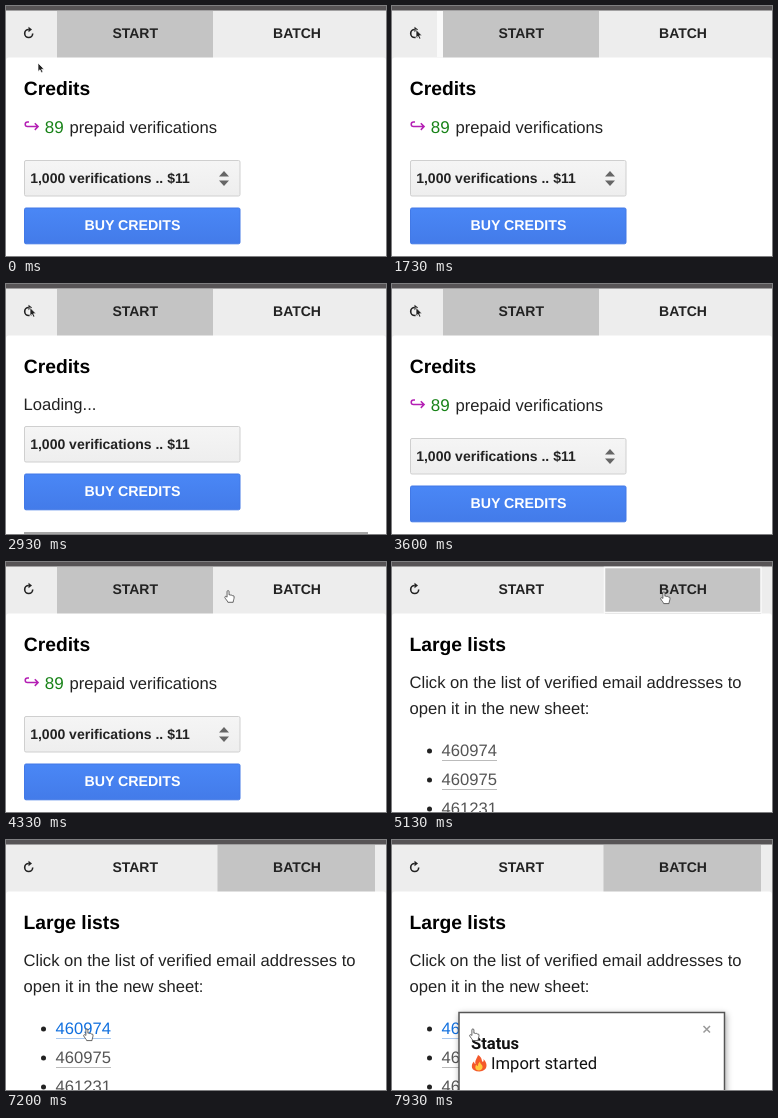
Recreate the animation shown at these times as an HTML page. Size 380 by 250 pixels, loop 8000 ms.

```html
<!DOCTYPE html>
<html lang="en">
<head>
<meta charset="utf-8">
<style>
  html, body { margin: 0; width: 100%; height: 100%; overflow: hidden; background: #fff; }
  svg { display: block; width: 380px; height: 250px; font: 16.6px "Liberation Sans", Arial, sans-serif; fill: #222; text-rendering: geometricPrecision; }
  .bold { font-weight: bold; font-size: 14px; }
  .title { font-weight: bold; font-size: 19.3px; fill: #000; }
  .link { fill: #555; }
  .link path { stroke: #bbb; }
  .link.hover { fill: #1170df; }
  .link.hover path { stroke: #a9c9f0; }
  #popup { font-family: Roboto, sans-serif; fill: #111; }
</style>
</head>
<body>
<svg viewBox="0 0 380 250">
  <defs>
    <linearGradient id="blue" x2="0" y2="1"><stop stop-color="#4a87f6"/><stop offset="1" stop-color="#437be9"/></linearGradient>
    <linearGradient id="gray" x2="0" y2="1"><stop stop-color="#f5f5f5"/><stop offset="1" stop-color="#eee"/></linearGradient>
    <filter id="shadow" x="-10%" y="-10%" width="120%" height="130%"><feDropShadow dx="1" dy="2" stdDeviation="3" flood-opacity=".35"/></filter>
  </defs>

  <rect width="380" height="250" fill="#ededed"/>
  <rect width="380" height="4.5" fill="#575456"/>
  <rect id="gap" x="45" y="5" width="6" height="46" fill="#fafafa"/>
  <rect id="activeTab" y="5" height="47" fill="#c4c4c4"/>
  <rect id="outline" x="212.500" y="5.500" width="156.500" height="45" fill="none" stroke="#fafafa" stroke-width="1.500"/>
  <path d="M0 250V54.500q0-3 3-3H377q3 0 3 3V250Z" fill="#fff"/>
  <path d="M26.700 27.500A4 4 0 1 1 22.700 23.500" fill="none" stroke="#222" stroke-width="1.600"/>
  <path d="M22.500 20.800L26 23.500L22.500 26.200Z"/>
  <g class="bold" text-anchor="middle"><text x="129.200" y="32">START</text><text x="291" y="32">BATCH</text></g>

  <g id="start">
    <text class="title" x="17.800" y="89">Credits</text>
    <g id="balance">
      <path d="M23 116h-1.500a2.200 2.200 0 0 0 0 4.600H32M28.800 117.300l3.300 3.300l-3.300 3.300" fill="none" stroke="#b41fb4" stroke-width="1.500"/>
      <text x="38.700" y="126.500" font-size="17" fill="#178217">89</text>
      <text x="63.500" y="126.500">prepaid verifications</text>
    </g>
    <text id="loading" x="17.500" y="126">Loading...</text>
    <g id="form">
      <rect x="18.500" y="154.500" width="215.500" height="35.500" rx="1.500" fill="url(#gray)" stroke="#cfcfcf"/>
      <text class="bold" x="24.200" y="177">1,000 verifications .. $11</text>
      <path id="arrows" d="M213 170.500l5-5.500l5 5.500zM213 174.500l5 5.500l5-5.500z" fill="#666"/>
      <rect x="18.500" y="202" width="215.500" height="35.800" rx="1.500" fill="url(#blue)" stroke="#4279e6"/>
      <text class="bold" x="126.400" y="224.300" text-anchor="middle" fill="#fff" style="font-size:14.200px">BUY CREDITS</text>
      <path d="M18 261H362" stroke="#888" stroke-width="1.300"/>
    </g>
  </g>

  <g id="batch">
    <text class="title" x="17.500" y="89">Large lists</text>
    <text x="17.500" y="126">Click on the list of verified email addresses to</text>
    <text x="17.500" y="152">open it in the new sheet:</text>
    <g id="list"></g>
  </g>

  <g id="popup">
    <rect x="67" y="172.500" width="265.500" height="100" fill="#fff" stroke="#555" stroke-width="1.500" filter="url(#shadow)"/>
    <path d="M311.500 186l6.500 6.500m0-6.500l-6.500 6.500" stroke="#999" stroke-width="1.500"/>
    <text x="79" y="209" font-weight="bold">Status</text>
    <path d="M86 215c5 3 3 6 5 7q1-1 .5-3c5 5 4 12-4 12.500c-9 0-9-7-5.500-10q0 2 1.500 2.500c-1-4 2-6 2.500-9z" fill="#f4592b"/>
    <path d="M88 221.500c0 3 3 3 2.500 6c-.5 4-7 4-7.200 0q0-2 1-3q.5 1.500 1.500 1.500q0-3 2.200-4.500z" fill="#ffc93c"/>
    <text x="99" y="229">Import started</text>
  </g>

  <path id="arrow" d="M0 0V8.500L2 6.800L3.400 9.800L5 9.100L3.600 6.200H6.200Z" fill="#222" stroke="#fff" stroke-width=".7"/>
  <path id="hand" d="M-1.100 6.500V1q0-1.100 1-1.100T.9 1V4.200q1.200-.6 1.800.4q1.200-.6 1.800.4q1.500-.3 1.500 1.200C6 8.500 5.100 9.500 5 11.600H-.3C-.7 10-2.600 8.500-3.300 6.900C-3.700 5.600-2.200 5.200-1.100 6.500Z" fill="#fff" stroke="#555" stroke-width=".9"/>
</svg>
<script>
const LOOP = 8000;
const $ = id => document.getElementById(id);
const show = (id, visible) => $(id).style.display = visible ? "" : "none";
const clamp = v => Math.max(0, Math.min(1, v));
const smooth = p => p * p * (3 - 2 * p);
const easeOut = p => 1 - (1 - p) ** 2;

$("list").innerHTML = ["460974", "460975", "461231"].map((id, i) =>
  `<g transform="translate(0 ${i * 29})"><circle cx="37.500" cy="189" r="2.500"/>
   <g class="link"><text x="49.500" y="194">${id}</text><path d="M50 198.500H105"/></g></g>`).join("");
const firstLink = document.querySelector(".link");

// start time, end time, target x, target y, easing
const moves = [
  [270, 600, 24, 24, smooth],
  [1730, 1731, 24, 23.5, smooth],
  [4000, 4600, 272, 30, easeOut],
  [5800, 6270, 95.5, 195, smooth],
  [6670, 6730, 81, 189, smooth]
];

function cursorAt(t) {
  let x = 32, y = 57;
  for (const [from, to, tx, ty, ease] of moves) {
    const p = ease(clamp((t - from) / (to - from)));
    x += (tx - x) * p;
    y += (ty - y) * p;
  }
  return [x, y];
}

function render(t) {
  const batch = t >= 5000;
  const loading = t >= 2930 && t < 3400;
  show("start", !batch);
  show("batch", batch);
  show("balance", !loading);
  show("loading", loading);
  show("arrows", t < 2930 || t >= 3000);
  $("form").setAttribute("transform", `translate(0 ${loading ? -12 : 0})`);

  const tabX = !batch ? 51 : t < 7070 ? 213 : 211.5;
  $("activeTab").setAttribute("x", tabX);
  $("activeTab").setAttribute("width", batch ? 369 - tabX : 156);
  $("gap").style.opacity = t < 1930 ? clamp((t - 1000) / 470) : 0;
  show("outline", batch && t < 7070);

  const [x, y] = cursorAt(t);
  const onLink = batch && y > 181 && x < 106;
  const hand = onLink || (x > 51 && y < 51);
  firstLink.classList.toggle("hover", onLink);
  show("hand", hand);
  show("arrow", !hand);
  $(hand ? "hand" : "arrow").setAttribute("transform", `translate(${x} ${y})`);

  $("popup").style.opacity = clamp((t - 7640) / 220);
}

function tick() {
  render(performance.now() % LOOP);
  requestAnimationFrame(tick);
}
tick();
</script>
</body>
</html>
```
